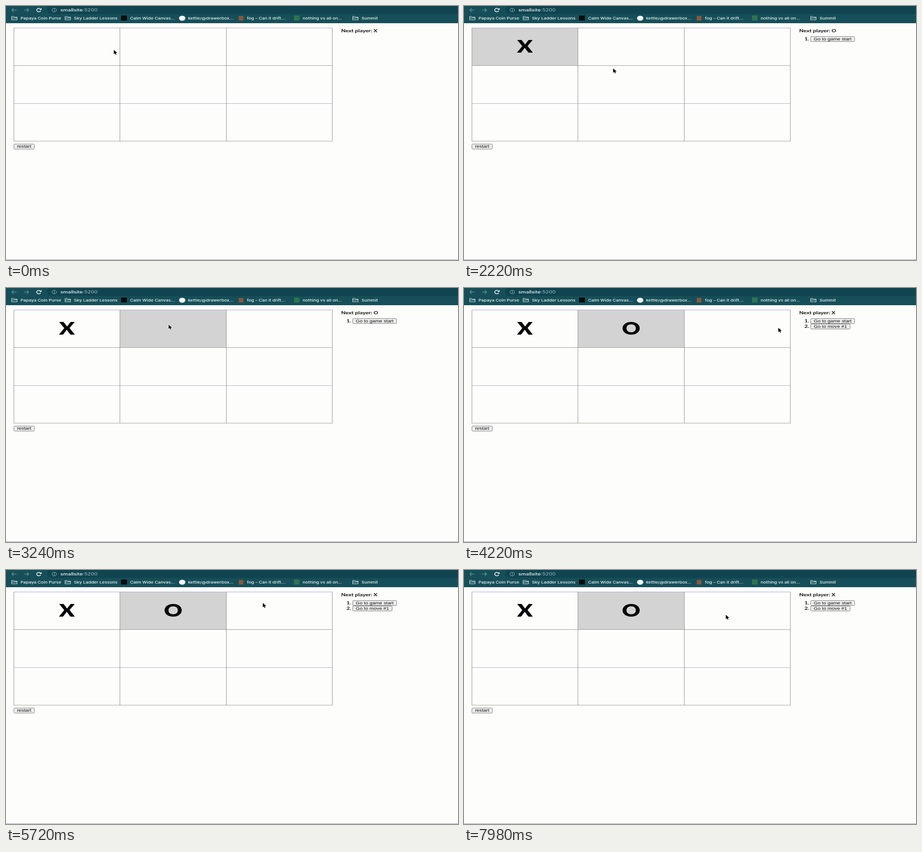
An HTML page with a canvas for the animation above (8000 ms loop, 998 px wide and 561 px high).

```html
<!DOCTYPE html>
<html lang="en">
<head>
<meta charset="utf-8">
<title>Tic-tac-toe</title>
<style>
html, body { margin: 0; width: 100%; height: 100%; overflow: hidden; background: #fdfdfc; }
canvas { display: block; }
</style>
</head>
<body>
<canvas id="stage" width="998" height="561"></canvas>
<script>
const ctx = document.getElementById('stage').getContext('2d');
const LOOP = 8000;
const ASPECT = 1.35; // the whole screen is shown wider than it is tall

const UI = 'Inter, sans-serif';
const PAGE = 'Lato, sans-serif';
const BUTTON = '"Liberation Sans", Arial, sans-serif';

const COLS = [17, 251, 486, 720];
const ROWS = [48, 131, 215, 298];
const ROW_COLORS = ['#a9a9cf', '#9a9a9a', '#b0b0cc', '#a3a394'];

// pointer tip: time, x, y
const PATH = [
  [0, 238, 97], [20, 238, 97], [280, 247, 98], [420, 247, 98],
  [720, 162, 82], [1820, 162, 82], [1920, 151, 84], [2220, 329, 138],
  [2540, 368, 118], [2640, 368, 118], [2960, 359, 81], [3560, 359, 81],
  [4040, 650, 98], [4220, 694, 88], [4320, 694, 88], [4780, 648, 84],
  [5620, 567, 73], [5860, 567, 73], [6580, 585, 119], [6700, 585, 120],
  [7020, 585, 122], [7420, 585, 122], [7560, 584, 125], [7980, 578, 99], [8000, 578, 99]
];

function slope(i, k) {
  const a = PATH[i - 1], b = PATH[i], c = PATH[i + 1];
  if (!a || !c || (b[k] - a[k]) * (c[k] - b[k]) <= 0) return 0;
  return (c[k] - a[k]) / (c[0] - a[0]);
}

function pointerAt(t) {
  let i = 0;
  while (i < PATH.length - 2 && t >= PATH[i + 1][0]) i++;
  const a = PATH[i], b = PATH[i + 1], d = b[0] - a[0], u = (t - a[0]) / d;
  const ease = u * u * (3 - 2 * u);
  return [1, 2].map(k =>
    a[k] + (b[k] - a[k]) * ease +
    d * u * (1 - u) * (slope(i, k) * (1 - u) - slope(i + 1, k) * u));
}

function rect(x, y, w, h, color) {
  ctx.fillStyle = color;
  ctx.fillRect(x, y, w, h);
}

function text(str, x, y, font, color, align = 'left') {
  ctx.save();
  ctx.translate(x, y);
  ctx.scale(ASPECT, 1);
  ctx.font = font;
  ctx.fillStyle = color;
  ctx.textAlign = align;
  ctx.fillText(str, 0, 0);
  const w = ctx.measureText(str).width * ASPECT;
  ctx.restore();
  return w;
}

function line(points, color, width) {
  ctx.beginPath();
  points.forEach(([x, y]) => ctx.lineTo(x, y));
  ctx.strokeStyle = color;
  ctx.lineWidth = width;
  ctx.stroke();
}

function oval(x, y, rx, ry) {
  ctx.beginPath();
  ctx.ellipse(x, y, rx, ry, 0, 0, Math.PI * 2);
}

function arrow(x, dir) {
  const c = '#6d9aa1';
  line([[x - 5, 9], [x + 5, 9]], c, 1.2);
  line([[x + dir, 5], [x + dir * 5, 9], [x + dir, 13]], c, 1.2);
}

function folder(x) {
  line([[x + 0.5, 30.5], [x + 0.5, 23], [x + 5, 23], [x + 6.5, 24.5],
        [x + 12.5, 24.5], [x + 12.5, 30.5], [x, 30.5]], '#e4eff0', 1);
  line([[x + 1, 26.5], [x + 12, 26.5]], '#e4eff0', 1);
}

function browserBar() {
  rect(0, 0, 998, 38, '#164f59');
  ctx.fillStyle = '#0f4450';
  ctx.beginPath();
  ctx.roundRect(91, -2, 920, 19.5, 9);
  ctx.fill();

  arrow(18, -1);
  arrow(45, 1);
  ctx.beginPath();
  ctx.ellipse(72.5, 9, 4.8, 3.7, 0, 0.5, 5.4);
  ctx.strokeStyle = '#fff';
  ctx.lineWidth = 1.5;
  ctx.stroke();
  ctx.beginPath();
  ctx.moveTo(78.5, 4.5);
  ctx.lineTo(78.5, 8.6);
  ctx.lineTo(73.5, 8.6);
  ctx.fillStyle = '#fff';
  ctx.fill();

  oval(106.5, 9, 5, 4);
  ctx.strokeStyle = '#a5bfc4';
  ctx.lineWidth = 1;
  ctx.stroke();
  rect(106, 8.3, 1.2, 3, '#a5bfc4');
  rect(106, 6.3, 1.2, 1, '#a5bfc4');

  const font = '500 8.7px ' + UI;
  const w = text('smallsite', 120, 12, font, '#f2f8f8');
  text(':5200', 120 + w, 12, font, '#8fb0b6');

  [12, 130, 765].forEach(folder);
  rect(254, 21, 13, 11, '#0a0d0e');
  oval(389, 27, 7, 5.5);
  ctx.fillStyle = '#f4f7f7';
  ctx.fill();
  rect(514, 22, 10, 10, '#8f5638');
  rect(636, 21, 12, 11, '#2f7350');

  const marks = [
    ['Papaya Coin Purse', 32], ['Sky Ladder Lessons', 150],
    ['Calm Wide Canvas...', 274], ['kettle/@drawerbox...', 402],
    ['fog – Can it drift...', 532], ['nothing vs all on...', 655],
    ['Summit', 785]
  ];
  marks.forEach(([s, x]) => text(s, x, 29.8, '500 7.4px ' + UI, '#eef5f5'));
}

function button(label, x, y, w) {
  ctx.beginPath();
  ctx.roundRect(x + 0.5, y + 0.5, w - 1, 11, 1.8);
  ctx.fillStyle = '#eeeeee';
  ctx.fill();
  ctx.strokeStyle = '#777';
  ctx.lineWidth = 1;
  ctx.stroke();
  text(label, x + w / 2, y + 8.8, '8.3px ' + BUTTON, '#111', 'center');
}

function board(focus, marks) {
  if (focus >= 0) {
    rect(COLS[focus], ROWS[0], COLS[focus + 1] - COLS[focus], ROWS[1] - ROWS[0], '#d3d3d3');
  }
  ROWS.forEach((y, i) => rect(17, y, 704, 1, ROW_COLORS[i]));
  COLS.forEach(x => rect(x, 48, 1, 251, '#8f8f88'));
  [...marks].forEach((m, i) =>
    text(m, (COLS[i] + COLS[i + 1] + 1) / 2, 102.5, '900 37px ' + PAGE, '#050508', 'center'));
  button('restart', 17, 304.5, 46);
}

function sidePanel(moves) {
  const font = '700 9.4px ' + PAGE;
  text('Next player: ' + (moves % 2 ? 'O' : 'X'), 740, 57.5, font, '#111');
  const items = [['Go to game start', 98], ['Go to move #1', 88]];
  items.slice(0, moves).forEach(([label, w], i) => {
    const y = 67 + i * 12;
    text(i + 1 + '.', 762, y + 9, font, '#111', 'right');
    button(label, 765, y, w);
  });
}

function pointer(x, y) {
  const shape = [[0, 0], [0, 9.3], [2.4, 7.4], [4.1, 10.8], [5.8, 10.2], [4.3, 6.8], [7.6, 6.6]];
  ctx.beginPath();
  shape.forEach(([dx, dy]) => ctx.lineTo(x + dx, y + dy));
  ctx.closePath();
  ctx.lineJoin = 'round';
  ctx.strokeStyle = '#fff';
  ctx.lineWidth = 1.8;
  ctx.stroke();
  ctx.fillStyle = '#000';
  ctx.fill();
  ctx.lineJoin = 'miter';
}

function draw() {
  const t = performance.now() % LOOP;
  const focus = t < 980 ? -1 : t < 3240 ? 0 : 1;
  const moves = t < 1080 ? 0 : t < 3340 ? 1 : 2;
  rect(0, 0, 998, 561, '#fdfdfc');
  rect(0, 560, 998, 1, '#9797a6');
  browserBar();
  board(focus, 'XO'.slice(0, moves));
  sidePanel(moves);
  pointer(...pointerAt(t));
  requestAnimationFrame(draw);
}
draw();
</script>
</body>
</html>
```
